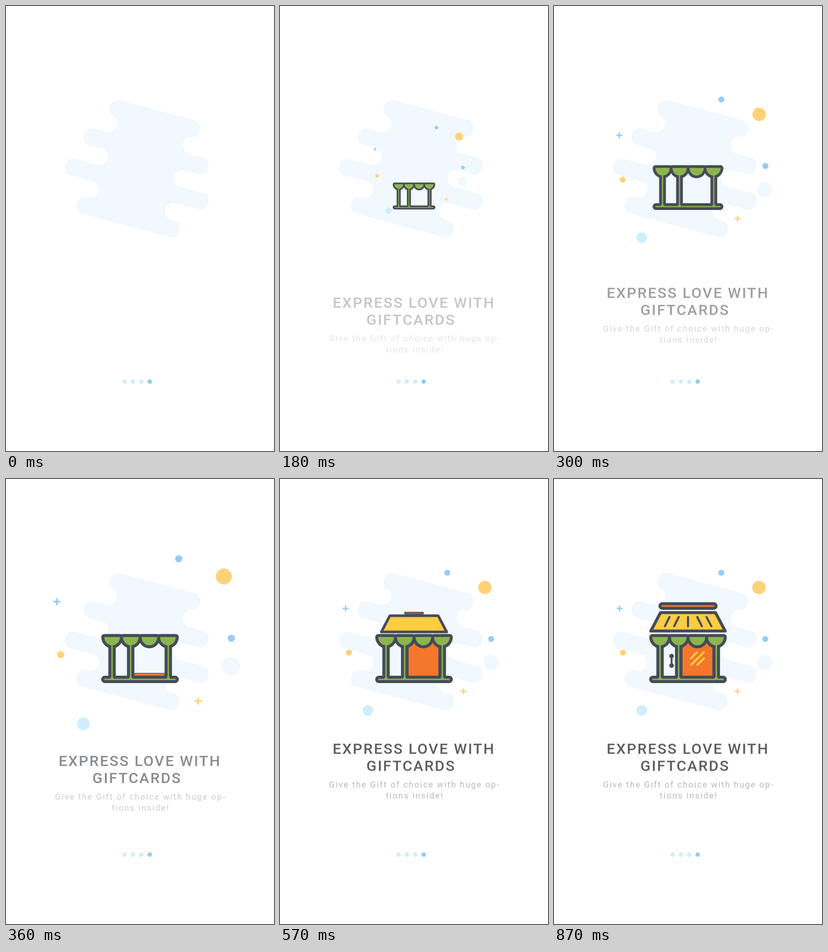
Write an HTML page without scripts that moves like this. It is 580 by 966 pixels and loops after 1.82 s.

```html
<!DOCTYPE html>
<html lang="en">
<head>
<meta charset="utf-8">
<title>Gift cards onboarding</title>
<style>
  html, body { margin: 0; width: 100%; height: 100%; overflow: hidden; background: #fff; }
  svg { display: block; width: 580px; height: 966px; }

  .anim { animation: 1820ms linear infinite both; }
  .burst   { transform-origin: 303px 356px; animation-name: burst; }
  .frame   { transform-origin: 290px 440px; animation-name: frame; }
  .window  { transform-origin: 310px 433px; animation-name: window; }
  .roof    { transform-origin: 290px 346px; animation-name: roof; }
  .sign    { transform-origin: 290px 299px; animation-name: sign; }
  .stripes { transform-origin: 290px 310px; animation-name: stripes; }
  .handle  { transform-origin: 254.5px 395px; animation-name: detail; }
  .glare   { transform-origin: 310px 390px; animation-name: detail; }
  .copy    { animation-name: copy; }

  @keyframes burst {
    0% { transform: scale(0); }
    19.78% { transform: scale(1.2); }
    29.67%, 100% { transform: scale(1); }
  }
  @keyframes frame {
    0% { transform: scale(0); }
    18.13%, 100% { transform: scale(1); }
  }
  @keyframes window {
    0%, 18.13% { transform: scaleY(0); }
    31.32%, 100% { transform: scaleY(1); }
  }
  @keyframes roof {
    0%, 19.78% { transform: scale(0); }
    32.97%, 100% { transform: scale(1); }
  }
  @keyframes sign {
    0%, 26.92% { transform: scale(0); }
    40.11%, 100% { transform: scale(1); }
  }
  @keyframes stripes {
    0%, 32.97% { transform: scale(0); }
    46.15%, 100% { transform: scale(1); }
  }
  @keyframes detail {
    0%, 34.62% { transform: scale(0); }
    47.8%, 100% { transform: scale(1); }
  }
  @keyframes copy {
    0% { transform: translateY(90.6px); opacity: 0; }
    28.02%, 100% { transform: none; opacity: 1; }
  }

  .line { stroke: #454b57; stroke-width: 6.5; stroke-linejoin: round; stroke-linecap: round; }
  .edge { fill: #454b57; stroke: #454b57; stroke-width: 13; stroke-linejoin: round; }
  .green { fill: #8bb64f; }
  .orange { fill: #f4772b; }
  .yellow { fill: #ffcd42; }
  .blue { fill: #96ccf4; }
  .gold { fill: #ffd277; }
  .sky { fill: #cfeefb; }
  .pale { fill: #f1f8fe; }
  .plus { fill: none; stroke-width: 3; stroke-linecap: round; }

  text { font-family: Roboto, Arial, sans-serif; white-space: pre; }
  .title { font-size: 32px; font-weight: 500; letter-spacing: 2.6px; fill: #585d62; }
  .sub { font-size: 18px; letter-spacing: 2.22px; fill: #b8b8b8; }
</style>
</head>
<body>
<svg viewBox="0 0 580 966" xmlns="http://www.w3.org/2000/svg">
  <defs>
    <path id="scallop" d="M-17 343a17 18 0 0 0 34 0z"/>
    <path id="post" d="M-1.5 355V430l-3 4h9l-3-4V355z"/>
    <path id="cross" d="M-5.3 0H5.3M0-5.3V5.3"/>
    <g id="stall">
      <use href="#scallop" x="229.7"/>
      <use href="#scallop" x="270"/>
      <use href="#scallop" x="310.3"/>
      <use href="#scallop" x="350.4"/>
      <use href="#post" x="229.5"/>
      <use href="#post" x="269.8"/>
      <use href="#post" x="351.2"/>
      <rect x="212.5" y="433.5" width="155" height="3" rx="1.5"/>
    </g>
  </defs>

  <path class="pale" transform="translate(283 353) rotate(15)" d="M-72.5-134H91.5
    a18.5 18.5 0 0 1 18.5 18.5a13.75 18.5 0 0 1-13.75 18.5
    a13.75 18.5 0 0 0-13.75 18.5a18.5 18.5 0 0 0 18.5 18.5
    H132.5a16 16 0 0 1 16 16v5a16 16 0 0 1-16 16
    H100.5a18.5 18.5 0 0 0 0 37
    H153a16 16 0 0 1 16 16v5a16 16 0 0 1-16 16
    H100.5a18.5 18.5 0 0 0 0 37
    H108a16 16 0 0 1 16 16v5a16 16 0 0 1-16 16
    H-89a16 16 0 0 1-16-16v-5a16 16 0 0 1 16-16
    H-84.5a18.5 18.5 0 0 0 0-37
    H-135a16 16 0 0 1-16-16v-5a16 16 0 0 1 16-16
    H-84.5a18.5 18.5 0 0 0 0-37
    H-113a16 16 0 0 1-16-16v-5a16 16 0 0 1 16-16
    H-84.5a18.5 18.5 0 0 0 18.5-18.5a12.5 18.5 0 0 0-12.5-18.5
    a12.5 18.5 0 0 1-12.5-18.5a18.5 18.5 0 0 1 18.5-18.5z"/>

  <g class="anim burst">
    <circle class="blue" cx="362" cy="203.5" r="6.5"/>
    <circle class="gold" cx="443.5" cy="235.5" r="14.5"/>
    <circle class="blue" cx="457" cy="347.5" r="6.5"/>
    <circle class="pale" cx="456" cy="398" r="16.5"/>
    <circle class="sky" cx="190" cy="502.5" r="11.5"/>
    <circle class="gold" cx="149" cy="377" r="6.5"/>
    <use class="plus" href="#cross" x="142" y="281" stroke="#96ccf4"/>
    <use class="plus" href="#cross" x="397" y="461" stroke="#ffd277"/>
  </g>

  <g class="anim sign">
    <rect class="line orange" x="229.3" y="270.7" width="121.4" height="10" rx="5"/>
  </g>
  <g class="anim roof">
    <path class="line yellow" d="M230.5 290H349.5L370.5 330H209.5z"/>
  </g>
  <g class="anim stripes">
    <path class="line" style="stroke-width:4.5" d="M250 299.5L240 319.5M270 299.5L260 319.5M290 299.5V319.5M310 299.5L320 319.5M330 299.5L340.5 319.5"/>
  </g>
  <g class="anim window">
    <rect class="line orange" x="275" y="343" width="71" height="88"/>
  </g>
  <g class="anim glare">
    <path fill="none" stroke="#ffcd42" stroke-width="4.5" d="M295 390.5L310.5 375M295.5 404.5L325.5 375M309 404.5L326 388"/>
  </g>
  <g class="anim frame">
    <use class="edge" href="#stall"/>
    <use class="green" href="#stall"/>
  </g>
  <g class="anim handle" fill="#454b57">
    <circle cx="254.5" cy="384.5" r="5"/>
    <circle cx="254.5" cy="405" r="5"/>
    <rect x="252.5" y="385" width="4" height="20"/>
  </g>

  <g class="anim copy">
    <text class="title" x="114" y="597">EXPRESS LOVE WITH</text>
    <text class="title" x="187" y="634">GIFTCARDS</text>
    <text class="sub" x="106" y="670">Give the Gift of choice with huge op-</text>
    <text class="sub" x="229" y="694">tions inside!</text>
  </g>

  <g class="sky">
    <circle cx="256.5" cy="815.3" r="4.8"/>
    <circle cx="274.6" cy="815.3" r="4.8"/>
    <circle cx="292.8" cy="815.3" r="4.8"/>
    <circle cx="311" cy="815.3" r="4.8" fill="#89d2ec"/>
  </g>
</svg>
</body>
</html>
```
